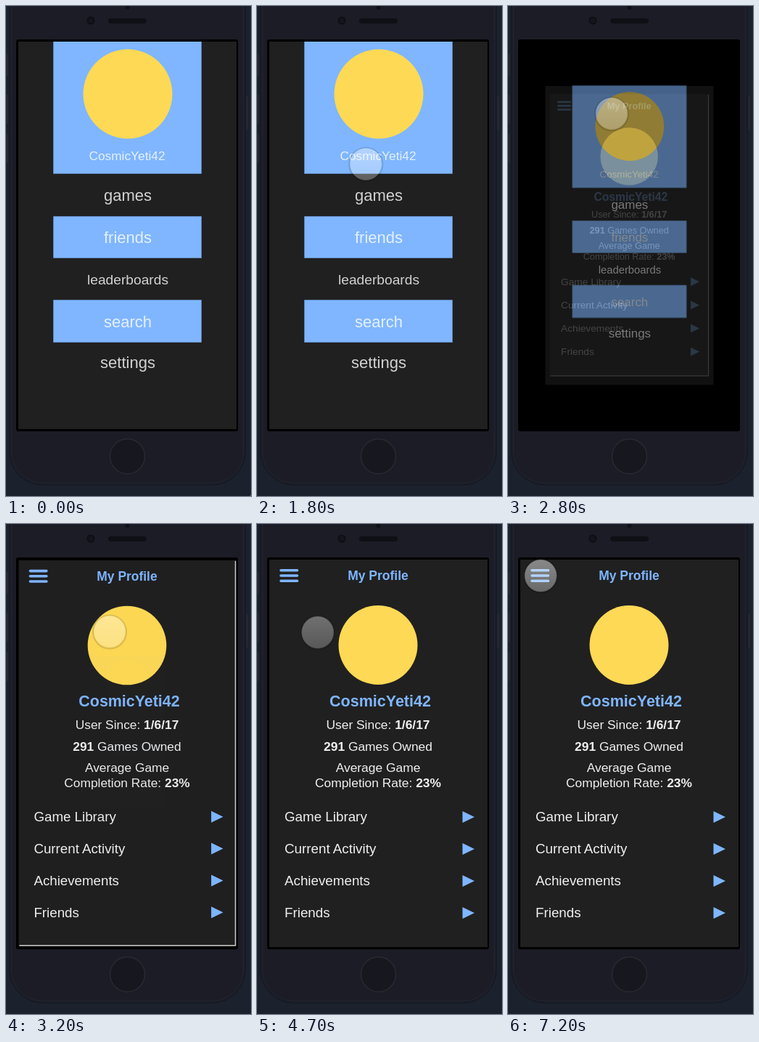
An HTML page that plays this animation: 338x674 px, repeating every 7300 ms.

```html
<!DOCTYPE html>
<html lang="en">
<head>
<meta charset="utf-8">
<title>Profile transition</title>
<style>
  html, body { margin: 0; width: 100%; height: 100%; overflow: hidden; background: #1c222d; }
  svg { display: block; width: 338px; height: 674px; font-family: "Liberation Sans", Arial, sans-serif; }
  text { fill: #f0f0f0; }
  .mid { text-anchor: middle; }
  .blue { fill: #7fb6ff; }
  .face { fill: #fed955; }
  .item { font-size: 22px; }
  .item text { fill: #fff; fill-opacity: .8; }
  .info { font-size: 17.4px; }
  .row { font-size: 18.8px; }
  tspan, .bold { font-weight: bold; }
</style>
</head>
<body>
<svg viewBox="0 0 338 674">
  <defs>
    <clipPath id="glass"><rect x="17" y="49" width="301" height="533"/></clipPath>
    <linearGradient id="shine" x2="0" y2="1">
      <stop stop-color="#fff"/>
      <stop offset="1" stop-color="#fff" stop-opacity=".7"/>
    </linearGradient>
  </defs>

  <g fill="#252831">
    <rect y="66" width="3" height="30" rx="1"/>
    <rect y="122" width="3" height="40" rx="1"/>
    <rect y="176" width="3" height="40" rx="1"/>
    <rect x="331" y="124" width="3" height="46" rx="1"/>
  </g>
  <rect x="4.5" y="-60" width="326" height="719" rx="46" fill="#1a1d27" stroke="#151821"/>
  <rect x="7.5" y="-57" width="320" height="713" rx="43" fill="#1b1c25" stroke="#22252f"/>
  <rect x="141" y="17" width="53" height="7" rx="3.5" fill="#0f1016"/>
  <circle cx="117" cy="20" r="4.5" fill="#14161d" stroke="#0d0f15" stroke-width="2"/>
  <circle cx="167.5" cy="2" r="3" fill="#0f1016"/>
  <circle cx="167.5" cy="619.5" r="24" fill="#17181f" stroke="#282a31" stroke-width="1.5"/>
  <rect x="14" y="46" width="306" height="539" rx="3"/>

  <g clip-path="url(#glass)">
    <g id="profile">
      <rect x="17" y="49" width="301" height="533" fill="#202020"/>
      <path id="edge" d="M317 50V580.5H18" fill="none" stroke="#ccc" stroke-width="1.5"/>
      <path d="M33 63.8H55.5M33 71H55.5M33 78.2H55.5" stroke="#7fb6ff" stroke-width="3.6" stroke-linecap="round"/>
      <text class="mid bold blue" x="167" y="77" font-size="17.5">My Profile</text>
      <circle class="face" cx="167" cy="166.5" r="54.5"/>
      <text class="mid bold blue" x="170" y="251" font-size="21.5">CosmicYeti42</text>
      <g class="mid info">
        <text x="167" y="281.5">User Since: <tspan>1/6/17</tspan></text>
        <text x="167" y="311.5"><tspan>291</tspan> Games Owned</text>
        <text x="167" y="341">Average Game</text>
        <text x="167" y="362">Completion Rate: <tspan>23%</tspan></text>
      </g>
      <g id="rows" class="row"></g>
    </g>

    <g id="menu">
      <rect x="17" y="49" width="301" height="533" fill="#202020"/>
      <path class="blue" stroke="#6089c0" d="M65.5 48.5H269.5V230.5H65.5zM65.5 289.5H269.5V346.5H65.5zM65.5 404.5H269.5V462.5H65.5z"/>
      <circle class="face" cx="168" cy="121" r="61.5"/>
      <g class="mid item">
        <text x="167" y="212" font-size="17.3">CosmicYeti42</text>
        <text x="168" y="268">games</text>
        <text x="168" y="326">friends</text>
        <text x="168" y="383" font-size="19.2">leaderboards</text>
        <text x="168" y="442">search</text>
        <text x="168" y="498">settings</text>
      </g>
    </g>
  </g>

  <g id="touch">
    <circle r="23" cy=".5" fill="none" stroke="#000" stroke-width="2" stroke-opacity=".35"/>
    <circle r="22" fill="url(#shine)" stroke="#aaa" stroke-opacity=".6"/>
  </g>
</svg>
<script>
  const LOOP = 7300, ZOOM_START = 2640, ZOOM_TIME = 610;
  const $ = id => document.getElementById(id);

  $('rows').innerHTML = ['Game Library', 'Current Activity', 'Achievements', 'Friends'].map((label, i) => {
    const y = 403 + i * 44;
    return `<text x="38" y="${y + 6.3}">${label}</text>
      <path class="blue" d="M283.5 ${y - 8}l16.5 8l-16.5 8z"/>`;
  }).join('');

  // time, x, y, opacity of the touch point
  const path = [
    [0, 353, 689, .4], [400, 306, 570, .4], [800, 232, 440, .4], [1200, 177, 359, .4],
    [1700, 152, 235, .4], [2200, 143, 148, .4], [3700, 143, 148, .37], [4400, 86, 149, .36],
    [4800, 83, 149, .36], [5600, 60, 96, .42], [6200, 46, 72, .47], [LOOP, 45, 71, .47]
  ];

  function touchAt(t) {
    const i = path.findIndex(p => p[0] > t);
    const a = path[i - 1], b = path[i], u = (t - a[0]) / (b[0] - a[0]);
    return a.map((v, k) => v + (b[k] - v) * u);
  }

  function place(el, scale, opacity) {
    el.setAttribute('transform', `translate(167.5 315.5) scale(${scale}) translate(-167.5 -315.5)`);
    el.setAttribute('opacity', opacity);
  }

  function draw(now) {
    const t = now % LOOP;
    const u = Math.min(1, Math.max(0, (t - ZOOM_START) / ZOOM_TIME));
    const p = 1 - (1 - u) ** 2;
    place($('menu'), 1 - p / 2, 1 - p);
    place($('profile'), .5 + p / 2, p);
    $('edge').setAttribute('opacity', p < 1 ? 1 : 0);

    const [, x, y, alpha] = touchAt(t);
    $('touch').setAttribute('transform', `translate(${x} ${y})`);
    $('touch').setAttribute('opacity', alpha);
  }

  const start = performance.now();
  function tick() {
    draw(performance.now() - start);
    requestAnimationFrame(tick);
  }
  tick();
</script>
</body>
</html>
```
